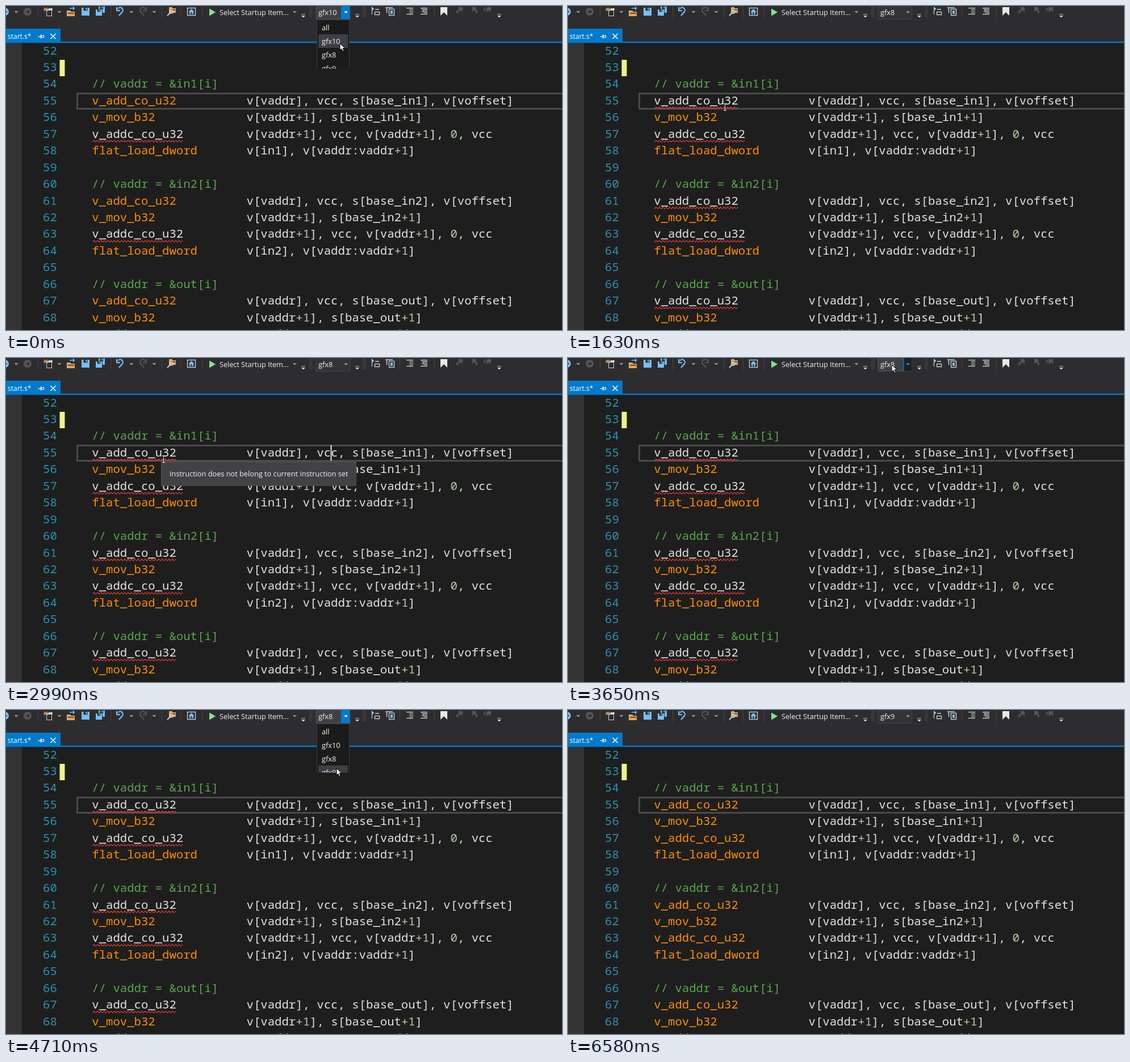
These frames come from a looping animation (979 by 572 pixels, 7 s). An HTML page with a canvas:

```html
<!DOCTYPE html>
<html lang="en">
<head>
<meta charset="utf-8">
<title>Assembly editor</title>
<style>
html, body { margin: 0; width: 100%; height: 100%; overflow: hidden; background: #1e1e1e; }
canvas { display: block; width: 979px; height: 572px; }
</style>
</head>
<body>
<canvas id="stage"></canvas>
<script>
const W = 979, H = 572, LOOP = 7000, STEP = 134.2;
const canvas = document.getElementById('stage');
const dpr = window.devicePixelRatio || 1;
canvas.width = W * dpr;
canvas.height = H * dpr;
const ctx = canvas.getContext('2d');

const SIZE = 20.63, CHAR = SIZE * 0.6, ROW = 29.44, CODE_X = 151.3;
const MONO = `500 ${SIZE}px "Noto Sans Mono", "DejaVu Sans Mono", monospace`;
const ui = size => size + 'px "Open Sans", "Noto Sans", sans-serif';
const C = {
  bar: '#2d2d30', edit: '#1e1e1e', blue: '#007acc', text: '#e2e2e2', ui: '#f1f1f1',
  op: '#ff8c00', note: '#57a64a', num: '#b5cea8', line: '#2b91af', err: '#e23a30',
  dim: '#55555a', grey: '#999999', sky: '#75bfff', gold: '#dfa866', icon: '#d4d4d4',
  edge: '#46464a', lit: '#3f3f46'
};

const block = name => [
  ['// vaddr = &' + name + '[i]'],
  ['v_add_co_u32', `v[vaddr], vcc, s[base_${name}], v[voffset]`],
  ['v_mov_b32', `v[vaddr+1], s[base_${name}+1]`],
  ['v_addc_co_u32', 'v[vaddr+1], vcc, v[vaddr+1], 0, vcc'],
  ['flat_load_dword', `v[${name}], v[vaddr:vaddr+1]`],
  []
];
const listing = [[], [], ...block('in1'), ...block('in2'), ...block('out').slice(0, 4)];
const unknown = { gfx10: /^v_addc_/, gfx8: /^v_addc?_/, gfx9: /^$/ };
const items = ['all', 'gfx10', 'gfx8', 'gfx9'];

// Pointer stops: step, x, y
const stops = [
  [0, 588, 66], [1, 588, 86], [3, 580, 97], [6, 581, 91], [8, 492, 179], [10, 320, 215],
  [12, 276, 179], [22, 277, 179], [25, 529, 53], [27, 570, 12], [29, 571, 12], [31, 578, 71],
  [33, 583, 100], [37, 581, 104], [39, 538, 210], [42, 579, 275], [45, 579, 275], [47, 857, 531]
];

function pointerAt(n) {
  const i = stops.findLastIndex(s => s[0] <= n);
  const [n0, x0, y0] = stops[i], [n1, x1, y1] = stops[i + 1] || [n + 1, x0, y0];
  const k = 1 - ((n1 - n) / (n1 - n0)) ** 2;
  return [Math.round(x0 + (x1 - x0) * k), Math.round(y0 + (y1 - y0) * k)];
}

function box(x, y, w, h, fill) {
  ctx.fillStyle = fill;
  ctx.fillRect(x, y, w, h);
}
function frame(x, y, w, h, color, width = 1) {
  ctx.strokeStyle = color;
  ctx.lineWidth = width;
  ctx.strokeRect(x, y, w, h);
}
function text(s, x, y, color, font) {
  ctx.font = font;
  ctx.fillStyle = color;
  ctx.fillText(s, x, y);
}
function line(x0, y0, x1, y1, color, width = 1.5) {
  ctx.beginPath();
  ctx.moveTo(x0, y0);
  ctx.lineTo(x1, y1);
  ctx.strokeStyle = color;
  ctx.lineWidth = width;
  ctx.stroke();
}
function cross(x, y, r, color) {
  line(x - r, y - r, x + r, y + r, color);
  line(x - r, y + r, x + r, y - r, color);
}
function arc(x, y, r, from, to, color, width = 1.5) {
  ctx.beginPath();
  ctx.arc(x, y, r, from, to);
  ctx.strokeStyle = color;
  ctx.lineWidth = width;
  ctx.stroke();
}
// Triangle with its tip r ahead in quarter turns: 0 right, 1 down, 2 left, 3 up
function tri(x, y, r, turn, color) {
  ctx.save();
  ctx.translate(x, y);
  ctx.rotate(turn * Math.PI / 2);
  ctx.beginPath();
  ctx.moveTo(r, 0);
  ctx.lineTo(0, r);
  ctx.lineTo(0, -r);
  ctx.fillStyle = color;
  ctx.fill();
  ctx.restore();
}
const drop = (x, y = 9, color = C.grey) => tri(x, y, 3.5, 1, color);

function overflow(x) {
  box(x - 4, 14, 7, 1.3, C.grey);
  drop(x - 0.5, 17, C.icon);
}
function grip(x) {
  for (let i = 0; i < 10; i++) {
    const y = 1 + i * 2, shift = i % 2 * 2;
    box(x + shift, y, 1.3, 1.3, '#606065');
    if (!shift) box(x + 4, y, 1.3, 1.3, '#606065');
  }
}
function round(x, color) {
  arc(x, 10, 3.5, 0, 7, color, 7);
  line(x - 4, 10, x + 2, 10, C.bar);
  tri(x, 10, 4, 0, C.bar);
}
function floppy(x, y, s) {
  box(x - 1, y - 1, s + 2, s + 2, C.bar);
  box(x, y, s, s, C.sky);
  box(x + s * 0.25, y, s * 0.5, s * 0.38, C.bar);
  box(x + s * 0.52, y, s * 0.14, s * 0.28, C.sky);
}
function folder(x, y, w) {
  box(x, y, w / 2, 3, C.gold);
  box(x, y + 2, w, 8, C.gold);
  box(x + 2, y + 4, w - 3, 1.5, C.bar);
}
function undo(x, dir, color) {
  ctx.save();
  ctx.translate(x, 0);
  ctx.scale(dir, 1);
  arc(0, 7.5, 4.8, -2.5, 0.8, color, 2.2);
  line(3.6, 10.5, -2, 17, color, 2.2);
  box(-7, 2, 2.2, 7, color);
  box(-7, 7, 7, 2.2, color);
  ctx.restore();
}
function bookmark(x, w, color) {
  box(x, 2, w, w * 1.25, color);
  tri(x + w / 2, 2 + w * 1.25, w / 2, 3, C.bar);
}
function indent(x, color) {
  for (let i = 0; i < 5; i++) {
    const inner = i % 4 ? 5 : 0;
    box(x + inner, 3 + i * 2.7, 12 - inner, 1.3, inner ? color : C.icon);
  }
}

function toolbar() {
  box(0, 0, W, 64, C.bar);
  [56, 184, 274, 308, 345, 693, 754].forEach(x => box(x, 0, 1, 21, C.edge));
  [18, 94, 221, 261, 508].forEach(x => drop(x));
  [524, 619, 869].forEach(overflow);
  [534, 628.5].forEach(grip);

  round(-2, C.sky);
  round(38, C.dim);
  frame(71.5, 7.5, 9, 10, C.icon);
  box(75, 4, 7, 3, C.icon);
  cross(70.5, 6, 3, C.gold);
  line(66, 6, 75, 6, C.gold);
  folder(107, 8, 14);
  line(112, 4, 119, 4, C.sky);
  tri(118, 4, 3.5, 0, C.sky);
  floppy(133, 3, 14);
  floppy(163, 1, 11);
  floppy(158, 6, 11);
  undo(201, 1, C.sky);
  undo(241, -1, C.dim);

  folder(287, 2, 12);
  arc(291, 10, 3, 0, 7, C.icon);
  line(289, 12, 284, 17, C.icon, 2);
  frame(319.5, 3.5, 14, 13, C.icon, 1.3);
  tri(326.5, 10, 5, 3, C.sky);
  box(323, 10, 7, 4.5, C.sky);
  box(325.5, 11, 2, 3.5, C.bar);

  ctx.save();
  ctx.translate(358, 11);
  ctx.scale(1.7, 1);
  tri(0, 0, 6.5, 0, '#8ae28a');
  ctx.restore();
  text('Select Startup Item...', 376, 16, C.ui, ui(12.65));

  tri(644, 5, 4, 0, C.icon);
  line(644.5, 2, 644.5, 15, C.sky);
  frame(649.5, 10.5, 8, 5, C.icon, 1.3);
  line(650, 6, 657, 6, C.icon);
  line(668, 3, 681, 3, C.icon);
  line(670.5, 3, 670.5, 12, C.icon);
  frame(674.5, 5.5, 9, 11, C.icon, 1.3);
  line(679, 8, 679, 14, C.sky, 4);
  indent(705, '#8dc58c');
  indent(730, C.icon);
  arc(732, 8, 2.5, -1.6, 1.6, C.sky);
  bookmark(765, 12, '#e8e8e8');
  [797, 821, 847].forEach(x => bookmark(x, 7, C.dim));
  tri(796, 10, 4, 2, C.dim);
  tri(827, 10, 4, 0, C.dim);
  cross(844, 6, 3, C.dim);

  box(0, 40, 96, 24, C.blue);
  box(0, 62.7, W, 2.5, C.blue);
  text('start.s*', 3, 58, '#ffffff', ui(12));
  line(57, 54, 61, 54, C.ui);
  line(61.5, 50.5, 61.5, 57.5, C.ui);
  frame(62, 52, 4.5, 3.5, C.ui, 1.2);
  cross(83, 53.5, 4.5, '#ffffff');
}

function combo(value, open, hover) {
  const lit = open || hover;
  box(546, 0, 60, 23.5, lit ? C.lit : '#333337');
  frame(546, -1, 59.5, 24, lit ? '#55555c' : C.edge);
  if (lit) {
    box(590, 0, 15.5, 23, C.blue);
    if (hover) box(591.5, 0, 14, 23, '#1f1f20');
  }
  drop(598.5, 9.5, open ? '#ffffff' : hover ? '#1c97ea' : C.grey);
  text(value, 550, 16, C.ui, ui(12.8));
}

function menu(pick) {
  ctx.save();
  ctx.beginPath();
  ctx.rect(546, 24, 60, 86.5);
  ctx.clip();
  box(547, 24, 58, 90, '#1b1b1c');
  frame(547.5, 24.5, 57, 100, '#3a3a3e');
  box(550, 26 + pick * 24, 52, 24, C.lit);
  items.forEach((name, i) => text(name, 556, 42.5 + i * 24, C.ui, ui(12.8)));
  ctx.restore();
}

function squiggle(x, y, width) {
  ctx.beginPath();
  for (let i = 0; i * 3 <= width; i++) ctx.lineTo(x + i * 3, y + (i % 2 ? 0 : 3));
  ctx.strokeStyle = C.err;
  ctx.lineWidth = 1.2;
  ctx.stroke();
}

function operands(s, y) {
  let col = 22;
  for (const part of s.split(/(\+1|\b0\b)/)) {
    text(part, CODE_X + col * CHAR, y, /^(\+1|0)$/.test(part) ? C.num : C.text, MONO);
    col += part.length;
  }
}

function editor(arch) {
  box(0, 65, W, H - 65, C.edit);
  box(0, 65.2, 28, H, '#333333');
  box(94.5, 95, 9, 29, '#eff284');
  frame(125.5, 154.5, W, 27, '#4a4a4a', 3);
  listing.forEach(([head, args], i) => {
    const y = 85.6 + i * ROW;
    text(String(52 + i), 65, y, C.line, MONO);
    if (!head) return;
    const bad = unknown[arch].test(head);
    text(head, CODE_X, y, !args ? C.note : bad ? C.text : C.op, MONO);
    if (bad) squiggle(152, y + 4.4, head.length * CHAR);
    if (args) operands(args, y);
  });
}

function tooltip() {
  box(273, 183, 343.5, 42.5, '#424245');
  frame(273.5, 183.5, 342.5, 41.5, '#535357');
  text('Instruction does not belong to current instruction set', 288, 208.5, C.ui, ui(12.75));
}

function arrow(x, y) {
  const outline = new Path2D('M0 0V12.2L2.8 9.6 4.8 14.2 7 13.2 5 8.8 9 8.6Z');
  ctx.save();
  ctx.translate(x, y);
  ctx.fillStyle = '#ffffff';
  ctx.strokeStyle = '#000000';
  ctx.lineWidth = 1;
  ctx.fill(outline);
  ctx.stroke(outline);
  ctx.restore();
}
function beam(x, y) {
  box(x, y - 6, 1, 12, C.text);
  box(x - 2, y - 7, 5, 1, C.text);
  box(x - 2, y + 5, 5, 1, C.text);
}

function draw(t) {
  const n = Math.floor(t / STEP);
  const between = (a, b) => n >= a && n < b;
  const arch = n < 5 ? 'gfx10' : n < 36 ? 'gfx8' : 'gfx9';
  const open = n < 5 || between(29, 36);
  const focus = between(5, 25) ? 5 : n >= 36 ? 36 : n + 4;
  const caretOn = Math.floor((n - focus) / 4) % 2 === 0;
  const [x, y] = pointerAt(n);

  ctx.setTransform(dpr, 0, 0, dpr, 0, 0);
  editor(arch);
  if (caretOn) box(571.5, 153.5, 2, 28, C.text);
  toolbar();
  combo(arch, open, between(27, 29));
  if (open) menu(Math.max(0, Math.floor((y - 26) / 24)));
  if (between(13, 23)) tooltip();
  if (n < 48) (open || y < 66 ? arrow : beam)(x, y);
}

const start = performance.now();
function tick() {
  draw((performance.now() - start) % LOOP);
  requestAnimationFrame(tick);
}
tick();
</script>
</body>
</html>
```
